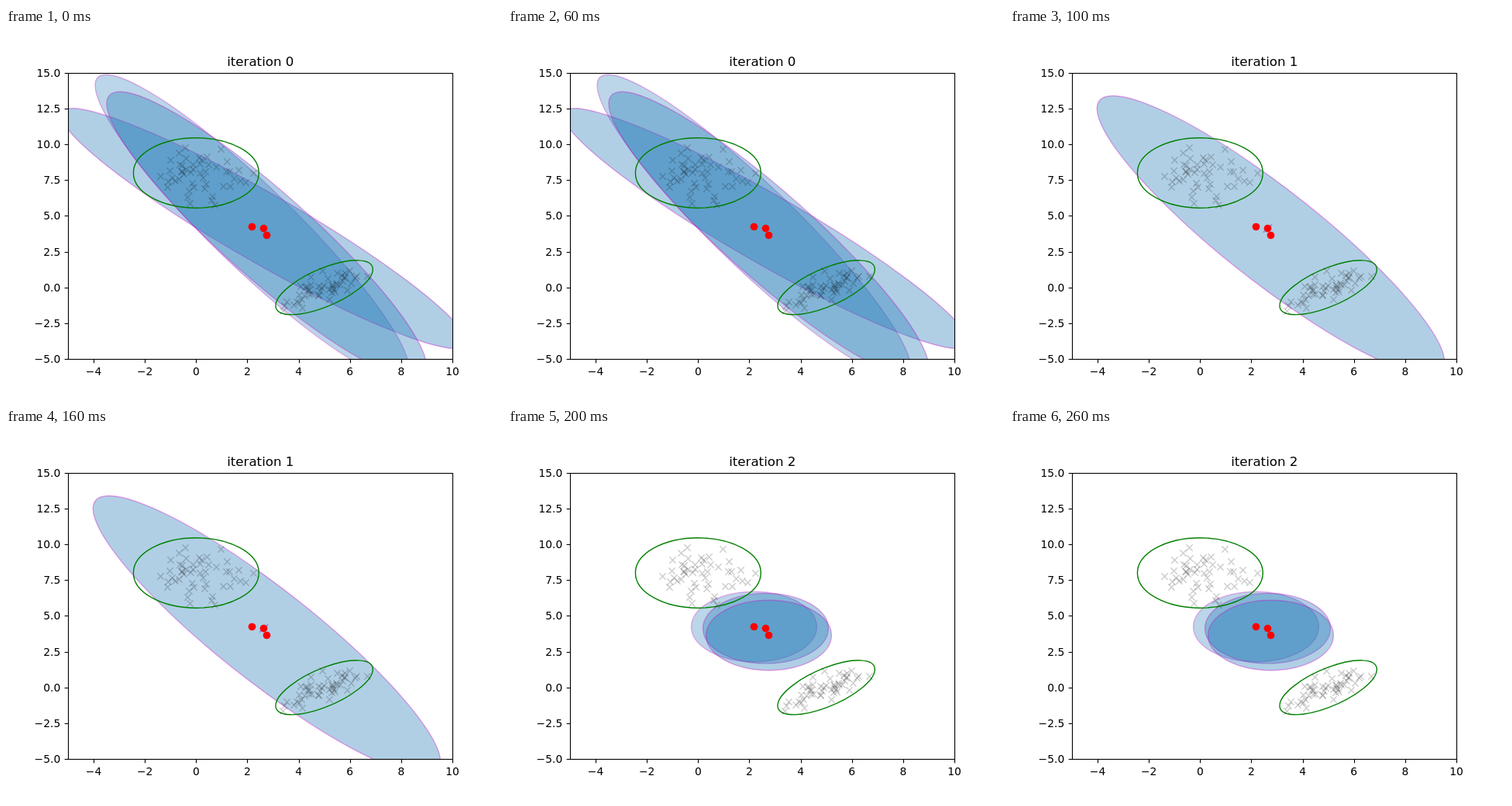
Recreate the animation shown at these times as an HTML page. Size 640 by 480 pixels, loop 300 ms.

```html
<!DOCTYPE html>
<html lang="en">
<head>
<meta charset="utf-8">
<title>Mixture fit</title>
<style>
html, body { margin: 0; width: 100%; height: 100%; overflow: hidden; background: #fff; }
svg { display: block; width: 640px; height: 480px; font: 13.89px "DejaVu Sans", sans-serif; }
.title { font-size: 16.67px; text-anchor: middle; }
.tick { text-anchor: middle; }
.side { text-anchor: end; }
.axis { fill: none; stroke: #000; stroke-width: 1.11; }
.blob, .truth { stroke-width: 1.39; vector-effect: non-scaling-stroke; }
.blob { fill: #1f77b4; stroke: #bf00bf; }
.truth { fill: none; stroke: #008000; }
.mark { fill: none; stroke: #000; stroke-width: 1.39; stroke-opacity: 0.2; }
.mean { fill: #f00; }
.step { visibility: hidden; animation: show 300ms step-end infinite; }
@keyframes show {
  0% { visibility: visible; }
  33.3333%, 100% { visibility: hidden; }
}
</style>
</head>
<body>
<svg id="plot" viewBox="0 0 640 480">
  <defs><clipPath id="area"><rect x="80" y="57.6" width="496" height="369.6"/></clipPath></defs>
</svg>
<script>
const plot = document.getElementById('plot');
const UX = 496 / 15, UY = 18.48;   // pixels per data unit
const px = x => 80 + (x + 5) * UX;
const py = y => 427.2 - (y + 5) * UY;
const snap = v => Math.floor(v + 0.5) + 0.5;

function add(parent, tag, attrs, text) {
  const el = document.createElementNS('http://www.w3.org/2000/svg', tag);
  for (const key in attrs) el.setAttribute(key, attrs[key]);
  if (text !== undefined) el.textContent = text;
  return parent.appendChild(el);
}

// Ellipse from centre, half extents and correlation (positive rises to the right).
function ellipse(parent, cls, [cx, cy], [hx, hy, rho], alpha = 1) {
  const m = [hx, -hy * rho, 0, hy * Math.sqrt(1 - rho * rho), cx, cy];
  add(parent, 'circle', {
    class: cls, r: 1, transform: `matrix(${m})`, 'fill-opacity': alpha, 'stroke-opacity': alpha
  });
}

let seed = 11;
function random() {
  seed = (seed * 16807) % 2147483647;
  return seed / 2147483647;
}

const K = Math.sqrt(5.99);   // 95 % radius of a 2D normal
const RX = K * UX, RY = K * UY;
const clusters = [
  { x: 0, y: 8, sd: 1, rho: 0 },
  { x: 5, y: 0, sd: Math.sqrt(0.6), rho: 2 / 3 }
];

// Normal samples: evenly spread radii, random angles.
function samples({ x, y, sd, rho }, n = 50) {
  return Array.from({ length: n }, (_, i) => {
    const r = sd * Math.sqrt(-2 * Math.log(1 - (i + 0.5) / (n + 3)));
    const a = random() * 2 * Math.PI;
    const u = r * Math.cos(a), v = r * Math.sin(a);
    return [snap(px(x + u)), snap(py(y + rho * u + Math.sqrt(1 - rho * rho) * v))];
  });
}
const r = 4.17;
const cross = ([x, y]) =>
  ({ class: 'mark', d: `M${x - r} ${y - r}l${2 * r} ${2 * r}m0 ${-2 * r}l${-2 * r} ${2 * r}` });
const crosses = clusters.flatMap(c => samples(c)).map(cross);

const means = [[317.5, 256.5], [332.5, 258.6], [336.5, 267.5]];
const weights = [0.3, 0.35, 0.35];
// Half extents and correlation of each component, per iteration.
const fits = [
  [[202.5, 196.3, -0.93], [262, 155, -0.945], [206.5, 185.2, -0.918]],
  [[1, 1, 0], [5.5, 5, 0.99], [224.2, 180, -0.908]],
  means.map(() => [RX, RY, 0])
];

fits.forEach((fit, i) => {
  const g = add(plot, 'g', { class: 'step', style: `animation-delay:${i * 100 - 300}ms` });
  const area = add(g, 'g', { 'clip-path': 'url(#area)' });
  fit.forEach((shape, k) => ellipse(area, 'blob', means[k], shape, weights[k]));
  for (const { x, y, sd, rho } of clusters)
    ellipse(area, 'truth', [px(x), py(y)], [RX * sd, RY * sd, rho]);
  for (const attrs of crosses) add(area, 'path', attrs);
  for (const [cx, cy] of means) add(area, 'circle', { class: 'mean', cx, cy, r: 4.86 });
  add(g, 'text', { class: 'title', x: 328.3, y: 49 }, 'iteration ' + i);
});

const label = (v, digits) => v.toFixed(digits).replace('-', '\u2212');

add(plot, 'rect', { class: 'axis', x: 80.5, y: 58.5, width: 496, height: 369 });
for (let v = -4; v <= 10; v += 2) {
  add(plot, 'path', { class: 'axis', d: `M${snap(px(v))} 427.5v4.86` });
  add(plot, 'text', { class: 'tick', x: px(v), y: 447.5 }, label(v, 0));
}
for (let v = -5; v <= 15; v += 2.5) {
  add(plot, 'path', { class: 'axis', d: `M80.5 ${snap(py(v))}h-4.86` });
  add(plot, 'text', { class: 'side', x: 70.3, y: Math.round(py(v) + 5) }, label(v, 1));
}
</script>
</body>
</html>
```
